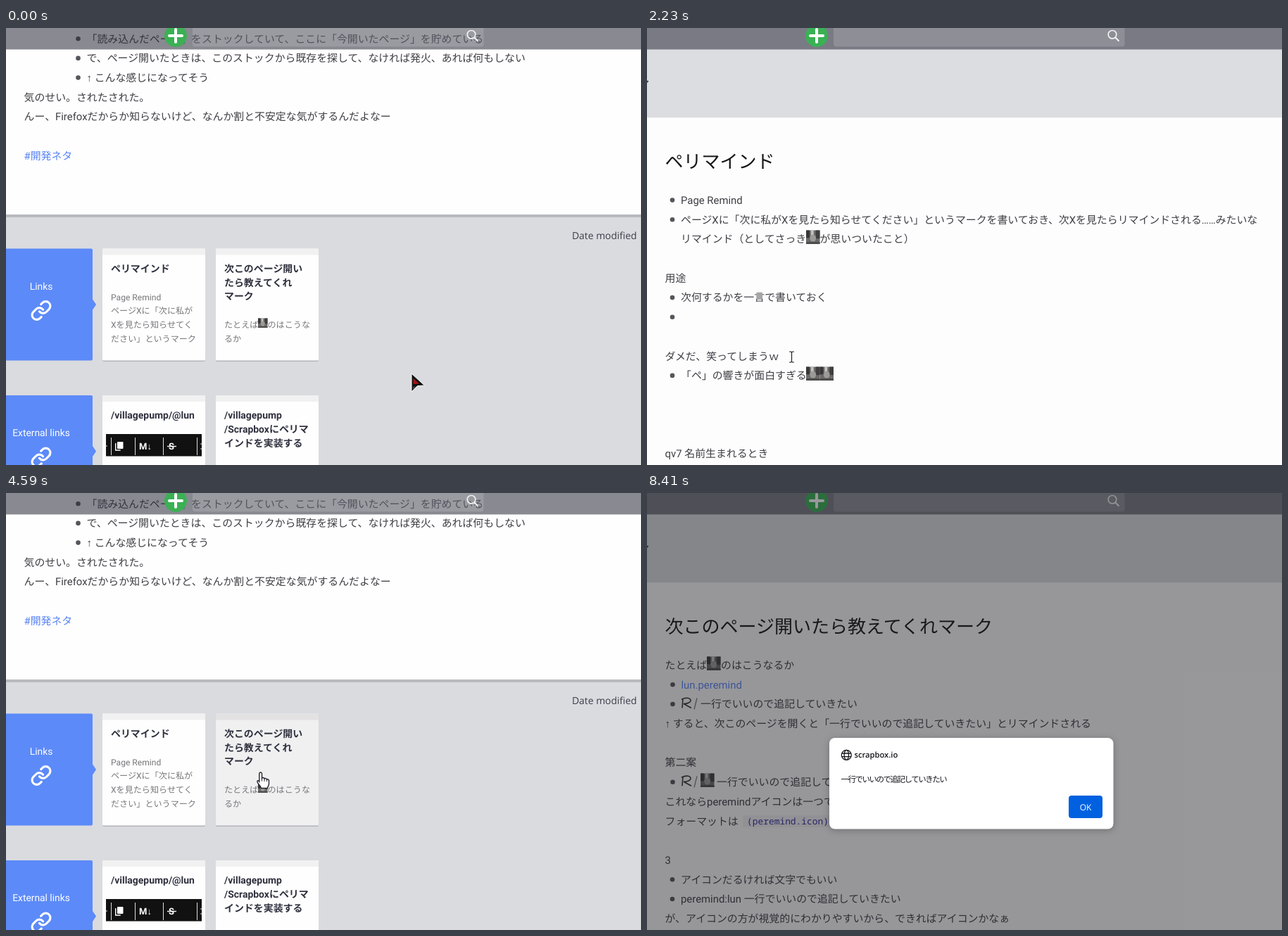
An HTML page that plays this animation: 902x621 px, repeating every 9620 ms.

```html
<!DOCTYPE html>
<html lang="ja">
<head>
<meta charset="utf-8">
<title>Page remind</title>
<style>
  html, body { margin: 0; width: 100%; height: 100%; overflow: hidden; background: #dadbdf; }
  svg { display: block; width: 902px; height: 621px; }
  text {
    font: 14.9px Roboto, "Liberation Sans", "Noto Sans CJK JP", "Noto Sans CJK", sans-serif;
    fill: #3e3e44; white-space: pre; text-rendering: geometricPrecision;
  }
  text.title { font-size: 26px; font-weight: 300; fill: #161616; }
  text.link { fill: #5783f5; }
  text.code { font: 12.9px "Noto Sans Mono", monospace; fill: #342d9c; }
  text.head { font-size: 13.95px; font-weight: 700; fill: #30313f; }
  text.body { font-size: 12.1px; fill: #77777b; }
  text.label { font-size: 13.8px; fill: #fff; text-anchor: middle; }
  text.sort { font: 13.9px "Open Sans", sans-serif; fill: #3c3d48; text-anchor: end; }
  text.host { font: 600 11.2px "Open Sans", sans-serif; fill: #15141a; }
  text.msg { font-size: 11.5px; font-weight: 500; letter-spacing: -1.5px; fill: #15141a; }
  text.ok { font: 12px "Open Sans", sans-serif; fill: #fff; text-anchor: middle; }
  text.tool { font-size: 13px; font-weight: 700; fill: #fff; }
  .card .face { fill: #fefefe; }
  .card .strip { fill: #f1f1f2; }
  .card.hover .face { fill: #f0f0f1; }
  .card.hover .strip { fill: #e2e2e3; }
</style>
</head>
<body>
<svg id="stage" viewBox="0 0 902 621"></svg>
<script>
const LOOP = 9620, PITCH = 27.7;

// Drawing helpers; text is placed by the middle of its line.
const rect = (x, y, w, h, fill, more = '') =>
  `<rect x="${x}" y="${y}" width="${w}" height="${h}" fill="${fill}" ${more}/>`;
const path = (d, stroke, width, more = '') =>
  `<path d="${d}" fill="none" stroke="${stroke}" stroke-width="${width}" ${more}/>`;
const text = (x, y, str, cls = '', drop = 5.3) =>
  `<text x="${x}" y="${y + drop}" class="${cls}">${str}</text>`;
const dot = (x, y) => `<circle cx="${x}" cy="${y}" r="3.3" fill="#55555b"/>`;
const item = (x, y, str = '', cls) => dot(x - 12, y) + text(x, y, str, cls);

const photo = (x, y, size = 19.5) => `<g transform="translate(${x} ${y}) scale(${size / 20})">
  ${rect(0, 0, 20, 20, '#6b6a69')}${rect(0, 0, 5, 11, '#383737')}${rect(7, 0, 4, 9, '#c4c3c1')}
  ${rect(14, 0, 6, 12, '#403f3f')}<ellipse cx="10" cy="11.5" rx="4.5" ry="5" fill="#9c9a97"/>
  ${rect(0, 17, 20, 3, '#4d4c4b')}</g>`;

const remindMark = (x, y) => `<g transform="translate(${x} ${y - 9.5})">` +
  path('M3 2L2 15M1 3C8-1 15 1 14 5C13 8 7 9 4 9L15 15', '#333', 1.6) +
  path('M23 1L19 17', '#77777b', 1.3) + '</g>';

const chain = y => `<g transform="translate(50 ${y}) scale(1.3) translate(-12 -12)">` +
  path('M10 13a5 5 0 0 0 7.54.54l3-3a5 5 0 0 0-7.07-7.07l-1.72 1.71' +
       'M14 11a5 5 0 0 0-7.54-.54l-3 3a5 5 0 0 0 7.07 7.07l1.71-1.71', '#fff', 2.4,
       'stroke-linecap="round"') + '</g>';

const group = (y, label) =>
  rect(-4, y, 127, 159, '#5c8af8', 'rx="2"') +
  `<path d="M123 ${y + 72}l5 7.5l-5 7.5z" fill="#5c8af8"/>` +
  text(50, y + 53, label, 'label', 5) + chain(y + 88);

const card = (id, x, y, heads, content) => `<g class="card" id="${id}">
  ${rect(x, y + 2, 146, 158.5, '#b3b4b9', 'rx="2"')}
  <rect class="face" x="${x}" y="${y}" width="146" height="159" rx="1.5"/>
  <rect class="strip" x="${x}" y="${y}" width="146" height="9"/>
  ${heads.map((s, i) => text(x + 12, y + 28.3 + i * 19.7, s, 'head', 5)).join('')}${content}</g>`;

const bodyLines = (x, y, lines) =>
  lines.map((s, i) => text(x, y + i * 19.7, s, 'body', 4.4)).join('');

const toolbar = rect(142, 577, 136, 31.5, '#111') +
  path('M142 594h2M149.5 582v25M183.5 582v25M223.5 582v25M271.5 582v25M276 591h2M276 598h2', '#ddd', 1) +
  path('M155.7 590v10h7', '#fff', 1.4) + rect(158, 588, 8.5, 10, '#fff', 'rx="1"') +
  text(189, 594, 'M↓', 'tool', 5) + text(231, 594, 'S', 'tool', 5) + path('M229 594.5h13', '#fff', 1.4);

const rowA = i => 15.2 + PITCH * i;
const listPage = `<g id="list">
  ${rect(0, 0, 902, 621, '#dadbdf')}
  ${rect(0, 0, 902, 265, '#fefefe')}${rect(0, 265, 902, 4, '#b9babe')}
  <g class="sheet">
  ${item(114.5, rowA(0), '「読み込んだページ」をストックしていて、ここに「今開いたページ」を貯めている')}
  ${item(114.5, rowA(1), 'で、ページ開いたときは、このストックから既存を探して、なければ発火、あれば何もしない')}
  ${item(114.5, rowA(2), '↑ こんな感じになってそう')}
  ${text(25.5, rowA(3), '気のせい。されたされた。')}
  ${text(25.5, rowA(4), 'んー、Firefoxだからか知らないけど、なんか割と不安定な気がするんだよなー')}
  ${text(25.5, rowA(6), '#開発ネタ', 'link')}
  </g>
  ${text(896, 294.5, 'Date modified', 'sort', 5)}
  ${group(313.5, 'Links')}${group(522, 'External links')}
  ${card('c1', 137, 313.5, ['ペリマインド'], bodyLines(149, 382.3,
    ['Page Remind', 'ページXに「次に私が', 'Xを見たら知らせてく', 'ださい」というマーク']))}
  ${card('c2', 298, 313.5, ['次このページ開い', 'たら教えてくれ', 'マーク'],
    bodyLines(310, 421.7, ['たとえば', 'るか']) + photo(358, 412.5, 13.5) +
    bodyLines(371.5, 421.7, ['のはこうな']))}
  ${card('c3', 137, 522, ['/villagepump/@lun'], toolbar)}
  ${card('c4', 298, 522, ['/villagepump', '/Scrapboxにペリマ', 'インドを実装する'], '')}
</g>`;

const row = i => 244.6 + PITCH * i;
const page = (id, title, content) => `<g id="${id}">
  ${rect(0, 0, 902, 621, '#dcdde0')}${rect(0, 75, 2, 1.5, '#222')}${rect(0, 77, 1, 1, '#555')}
  <g class="sheet">${rect(0, 127.3, 902, 500, '#fdfdfd')}${text(25.5, 189.5, title, 'title', 9)}${content}</g></g>`;

const remindPage = page('remind', 'ペリマインド',
  item(48, row(0), 'Page Remind') +
  item(48, row(1), 'ページXに「次に私がXを見たら知らせてください」というマークを書いておき、次Xを見たらリマインドされる……みたいな') +
  text(48, row(2), 'リマインド（としてさっき') + photo(226, 287.5) + text(245.5, row(2), 'が思いついたこと）') +
  text(25.5, row(4), '用途') +
  item(48, row(5), '次何するかを一言で書いておく') + item(48, row(6)) +
  text(25.5, row(8), 'ダメだ、笑ってしまうｗ') +
  item(48, row(9), '「ペ」の響きが面白すぎる') + photo(226, 481.5) + photo(245.5, 481.5) +
  `<g id="rule">${rect(28, 573, 846, 1.3, '#d3d3d5')}</g>` +
  text(25.5, row(13), 'qv7 名前生まれるとき'));

const todo = '一行でいいので追記していきたい';
const markPage = page('mark', '次このページ開いたら教えてくれマーク',
  text(25.5, row(0), 'たとえば') + photo(85, 232.5) + text(105, row(0), 'のはこうなるか') +
  item(48.5, row(1), 'lun.peremind', 'link') +
  dot(36.5, row(2)) + remindMark(48, row(2)) + text(76, row(2), todo) +
  text(25.5, row(3), `↑ すると、次このページを開くと「${todo}」とリマインドされる`) +
  text(25.5, row(5), '第二案') +
  dot(36.5, row(6)) + remindMark(48, row(6)) + photo(76, 398.5) + text(99, row(6), todo) +
  text(25.5, row(7), 'これならperemindアイコンは一つでいい') +
  text(25.5, row(8), 'フォーマットは') + rect(136, 458, 126, 17, '#f2f2f4') +
  text(142, row(8), '(peremind.icon)', 'code', 4.8) +
  text(25.5, row(10), '3') +
  item(48, row(11), 'アイコンだるければ文字でもいい') +
  item(48, row(12), `peremind:lun ${todo}`) +
  text(25.5, row(13), 'が、アイコンの方が視覚的にわかりやすいから、できればアイコンかなぁ'));

const header = rect(0, 0, 902, 30.5, 'rgba(40,42,58,.55)') +
  rect(265, -8, 413.5, 34.5, 'rgba(255,255,255,.15)', 'rx="4"') +
  '<circle cx="241" cy="11" r="16" fill="#3bb054"/>' +
  path('M232 11h18M241 2v18', '#fff', 4, 'stroke-linecap="round"') +
  '<circle cx="661" cy="9.3" r="5.8" fill="none" stroke="#f2f2f4" stroke-width="1.7"/>' +
  path('M665.2 13.5l5.3 5.3', '#f2f2f4', 2);

const dialog = `<g id="dialog">
  ${rect(0, 0, 902, 621, 'rgba(28,27,34,.45)')}
  ${rect(259, 348, 403.5, 129.5, '#fff', 'rx="8" style="filter:drop-shadow(0 2px 5px rgba(0,0,0,.25))"')}
  <g fill="none" stroke="#15141a" stroke-width="1.3"><circle cx="283.3" cy="372.3" r="7"/>
  <ellipse cx="283.3" cy="372.3" rx="3.2" ry="7"/><path d="M276.5 370h13.6M276.5 374.6h13.6"/></g>
  ${text(294.5, 372.3, 'scrapbox.io', 'host', 4)}${text(275.5, 407, todo, 'msg', 4.2)}
  ${rect(599, 430, 48, 32, '#0061e0', 'rx="4"')}${text(623, 446.3, 'OK', 'ok', 4.5)}</g>`;

const cursors = `<g id="arrow"><path d="M0 0L18.5 17L8.5 17.5L0 26z" fill="#111" stroke="#fff" stroke-width="1"/>
  <path d="M2.5 7V15L11 14.5z" fill="#a81414"/><path d="M2 18.5h4.5L2 23z" fill="#444"/></g>
  <g id="hand"><path d="M-1.7 1.7C-1.7-.5 2-.5 2 1.7V8.5C3 7 5.3 7.3 5.5 9C7 8 8.6 8.6 8.9 10C10.6 9.3 12 10.3 12 12V16C12 19 10 20 10 22.5H1C1 20-3.5 17-4.5 13.5C-5 11.5-3 11-1.7 13z"
  fill="#fff" stroke="#23242c" stroke-width="1.4"/>${path('M2 8.5v4M5.5 9v4M8.9 10v3', '#23242c', 1)}</g>
  <g id="beam">${path('M-3.5-7.5H-1L0-6.5L1-7.5H3.5M-3.5 7.5H-1L0 6.5L1 7.5H3.5M0-7V7', '#222', 1.2)}</g>`;

const $ = id => document.getElementById(id);
$('stage').innerHTML = listPage + remindPage + markPage + header + dialog + cursors;

// [start, cursor, x, y, hovered card]
const moves = [
  [0, 'arrow', 576, 491], [800, 'arrow', 573, 497], [930, 'arrow', 558, 513],
  [1060, 'arrow', 531, 518], [1190, 'arrow', 425, 507], [1320, 'arrow', 315, 491],
  [1450, 'arrow', 241, 488], [1580, 'hand', 231, 420, 'c1'],
  [2100, 'beam', 214, 452], [2230, 'beam', 205.5, 467.5], [2360, 'beam', 340, 404],
  [2490, 'beam', 560, 316], [2620, 'beam', 650, 285], [3150, 'beam', 254, 397],
  [3280, ''], [3550, 'beam', 151.5, 554],
  [3810, 'hand', 153, 550, 'c3'], [3940, 'hand', 165, 538, 'c3'], [4070, 'arrow', 195, 505],
  [4200, 'hand', 240, 465, 'c1'], [4330, 'arrow', 288, 434], [4460, 'hand', 335, 408, 'c2'],
  [4590, 'hand', 361.5, 397, 'c2'],
  [5910, 'arrow', 362, 396.5], [6430, 'arrow', 370, 426], [6560, 'arrow', 377, 448],
  [6820, 'arrow', 361, 437], [6950, 'arrow', 345, 410], [7080, 'arrow', 358, 388],
  [7210, 'arrow', 384, 392], [7340, 'arrow', 394, 411], [7470, 'arrow', 383, 426],
  [7600, 'arrow', 374, 424], [7730, 'arrow', 376, 419], [7860, 'arrow', 377, 418],
  [8260, 'arrow', 369, 604], [8410, '']
];
// [start, view]; every new view spends its first step faded in part
const views = [[0, 'list'], [2100, 'remind'], [3810, 'list'], [5910, 'mark']];

const at = (table, t) => table.filter(r => r[0] <= t).pop();
const show = (id, on) => { $(id).style.display = on ? '' : 'none'; };

function draw(t) {
  const [start, view] = at(views, t);
  const entering = start > 0 && t < start + 130;
  for (const id of ['list', 'remind', 'mark']) show(id, id === view);
  const sheet = $(view).querySelector('.sheet');
  sheet.setAttribute('opacity', entering ? .45 : 1);
  sheet.setAttribute('transform', `translate(0 ${entering ? 3 : 0})`);
  show('rule', t >= 2360);
  show('dialog', view === 'mark');

  const [, kind, x, y, hover] = at(moves, t);
  for (const id of ['arrow', 'hand', 'beam']) show(id, id === kind);
  if (kind) $(kind).setAttribute('transform', `translate(${x} ${y})`);
  for (const id of ['c1', 'c2', 'c3', 'c4']) $(id).classList.toggle('hover', id === hover);
}

const t0 = performance.now();
function tick() {
  draw((performance.now() - t0) % LOOP);
  requestAnimationFrame(tick);
}
tick();
</script>
</body>
</html>
```
